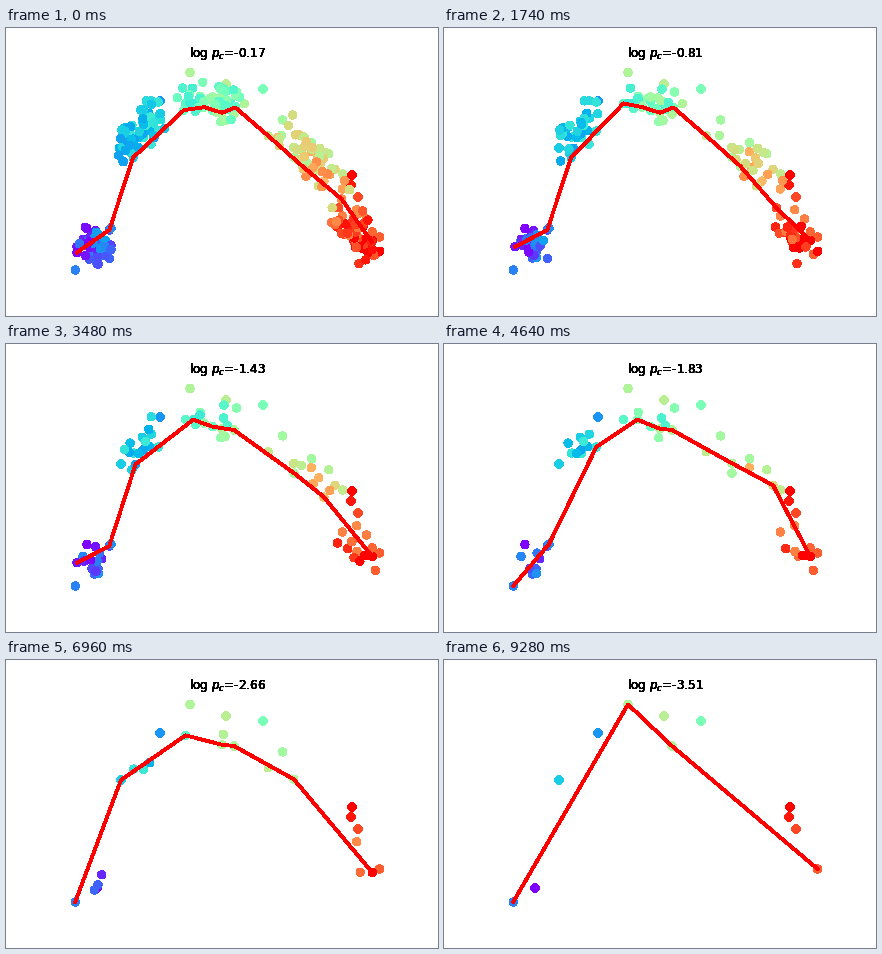
These frames come from a looping animation (432x288 px, 9860 ms). A matplotlib script:

```python
import numpy as np
import matplotlib.pyplot as plt
from matplotlib.animation import FuncAnimation

W, H, DPI = 432, 288, 72
FRAMES, STEP_MS = 17, 580
LEFT, RIGHT, TOP, BOTTOM = 69.2, 373.6, 44.4, 242.1
MOST = 300

# Clusters: centre x, y, axis angle in degrees, spread along and across, hue range
CLUSTERS = [
    (88, 217, 0, 8.5, 9.5, 0.00, 0.22),
    (135, 104, -50, 17, 8, 0.22, 0.37),
    (207, 74, 5, 18, 9.5, 0.37, 0.60),
    (304, 132, 47, 25, 9, 0.57, 0.82),
    (348, 204, 60, 15, 9, 0.82, 1.00),
]

# Dots that outlast all others: x, y, hue
CORE = np.array([
    (69, 242, 0.17), (91, 228, 0), (115, 120, 0.3), (154, 73, 0.2),
    (184, 44, 0.59), (220, 56, 0.61), (228, 86, 0.59), (257, 61, 0.49),
    (346, 147, 1), (345, 157, 0.97), (352, 169, 0.91), (374, 209, 0.88),
])

# Course of the path, passed at equal intervals
COURSE = np.array([
    (72, 230), (102, 203), (138, 122), (186, 71), (207, 84),
    (228, 82), (245, 84), (288, 128), (325, 168), (366, 214),
])

# Key values of the score, evenly spaced until the pace halves
SCORE_STEPS = [0, 2, 4, 6, 8, 12, 16]
SCORES = [-0.17, -0.6, -1.02, -1.43, -1.83, -2.66, -3.51]


def all_dots():
    """Every dot as x, y, hue, those that vanish first placed last."""
    rng = np.random.default_rng(11)
    rows = []
    for i in range(MOST - len(CORE)):
        cx, cy, angle, along, across, low, high = CLUSTERS[i % len(CLUSTERS)]
        a, b = np.clip(rng.normal(size=2), -2, 2)
        c, s = np.cos(np.radians(angle)), np.sin(np.radians(angle))
        x = cx + a * along * c - b * across * s
        y = cy + a * along * s + b * across * c
        mix = np.clip(0.5 + 0.15 * a + rng.uniform(-0.5, 0.5), 0, 1)
        rows.append((x, y, low + (high - low) * mix))
    dots = np.vstack([CORE, rows])
    dots[:, :2] = np.clip(dots[:, :2], (LEFT, TOP), (RIGHT, BOTTOM))
    return dots


DOTS = all_dots()


def path_through(dots, size):
    """Join the dots nearest to evenly spaced stops on the course."""
    knots = np.arange(len(COURSE))
    stops = np.linspace(0, knots[-1], size)
    route = []
    for stop in stops:
        aim = [np.interp(stop, knots, COURSE[:, axis]) for axis in (0, 1)]
        nearest = np.argmin(np.hypot(*(dots[:, :2] - aim).T))
        route.append(dots[nearest, :2])
    return np.array(route)


fig = plt.figure(figsize=(W / DPI, H / DPI), dpi=DPI, facecolor="white")
ax = fig.add_axes([0, 0, 1, 1])
ax.set_xlim(0, W)
ax.set_ylim(H, 0)
ax.axis("off")

scatter = ax.scatter([], [], s=46, linewidths=1.5, antialiased=False, zorder=1)
line, = ax.plot([], [], color="red", lw=2.8, antialiased=False, zorder=2)
# Stacked copies give the title its hard, heavy edge
titles = [ax.text(221.4, 28.6, "", size=12, ha="center", va="baseline",
                  family="DejaVu Sans") for _ in range(12)]


def draw(step):
    part = step / (FRAMES - 1)
    dots = DOTS[:round(MOST * (len(CORE) / MOST) ** part)]
    path = path_through(dots, round(11 - 7 * part ** 2))
    colors = plt.cm.rainbow(dots[:, 2])
    scatter.set_offsets(dots[:, :2])
    scatter.set_facecolor(colors)
    scatter.set_edgecolor(colors)
    line.set_data(path[:, 0], path[:, 1])
    score = round(float(np.interp(step, SCORE_STEPS, SCORES)), 2)
    for title in titles:
        title.set_text(f"log $p_c$={score:g}")
    return [scatter, line, *titles]


anim = FuncAnimation(fig, draw, frames=FRAMES, interval=STEP_MS,
                     init_func=lambda: draw(0), repeat=True, repeat_delay=0)
plt.show()
```
